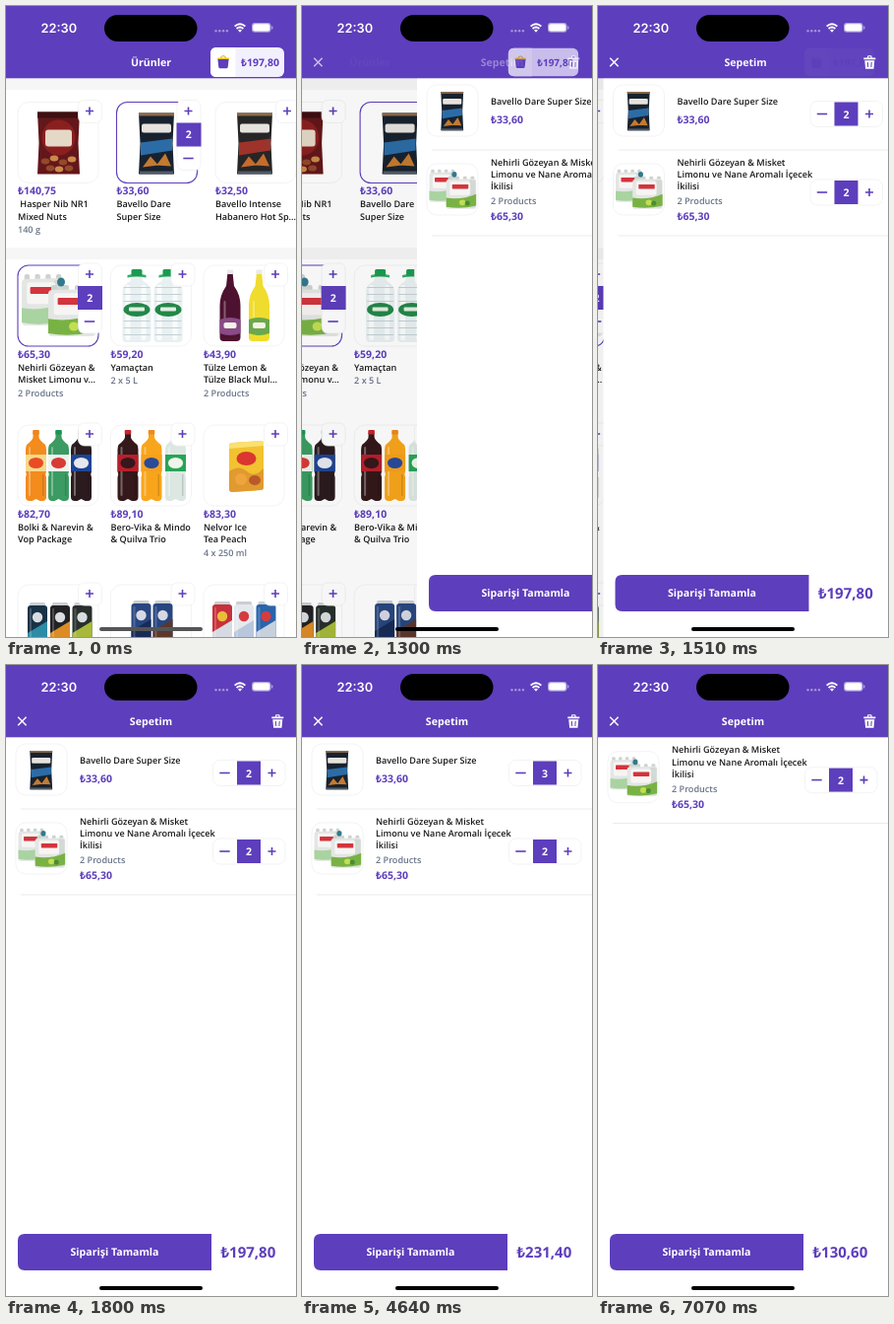
An HTML page for the animation above (7.99 s loop, 295 by 640 pixels).

```html
<!DOCTYPE html>
<html lang="tr">
<head>
<meta charset="utf-8">
<title>Sepetim</title>
<style>
html, body { margin: 0; width: 100%; height: 100%; overflow: hidden; background: #fff; }
svg { display: block; width: 295px; height: 640px; font-family: "Open Sans", "Noto Sans", sans-serif; text-rendering: geometricPrecision; }
text { white-space: pre; }
.name { font-size: 9.08px; font-weight: 600; fill: #191919; }
.sub { font-size: 9.08px; font-weight: 600; fill: #697488; }
.price { font-size: 10.5px; font-weight: 700; fill: #5d3ebc; }
.total { font-size: 15px; font-weight: 700; fill: #5d3ebc; }
.white { font-size: 10.6px; font-weight: 700; fill: #fff; text-anchor: middle; }
.clock { font: 600 12.8px Inter, sans-serif; fill: #fff; text-anchor: middle; }
.frame { fill: #fff; stroke: #f0f0f0; stroke-width: .8; }
.chosen { stroke: #5d3ebc; stroke-width: 1.1; }
.sign { fill: none; stroke: #5d3ebc; stroke-width: 1.6; }
</style>
</head>
<body>
<svg id="stage" viewBox="0 0 295 640"></svg>
<script>
const PURPLE = "#5d3ebc";
const LOOP = 7990;

// Basic pieces
const rect = (x, y, w, h, fill, r = 0) =>
  `<rect x="${x}" y="${y}" width="${w}" height="${h}" rx="${r}" fill="${fill}"/>`;
const oval = (x, y, rx, ry, fill) =>
  `<ellipse cx="${x}" cy="${y}" rx="${rx}" ry="${ry}" fill="${fill}"/>`;
const path = (d, fill) => `<path d="${d}" fill="${fill}"/>`;
const text = (x, y, cls, s, id = "") => `<text x="${x}" y="${y}" class="${cls}" id="${id}">${s}</text>`;
const group = (x, y, body, id = "", scale = 1) =>
  `<g id="${id}" transform="translate(${x} ${y}) scale(${scale})">${body}</g>`;
const frame = (x, y, w, h, r, cls = "") =>
  `<rect x="${x}" y="${y}" width="${w}" height="${h}" rx="${r}" class="frame ${cls}"/>`;
const plus = (x, y) => `<path class="sign" d="M${x - 4} ${y}h8m-4-4v8"/>`;
const minus = (x, y, r = 5.2) => `<path class="sign" d="M${x - r} ${y}h${2 * r}"/>`;

const trash = (x, y, scale, fill, line) => group(x, y,
  path("M-6-4.6h3.4l.8-2.2h3.6l.8 2.2H6v1.8H-6zM-5-1.8H5L4.2 6.8H-4.2z", fill) +
  `<path d="M-1.9 0l.3 5M1.9 0l-.3 5" stroke="${line}" fill="none"/>` +
  rect(-1.2, -5.7, 2.4, 1.1, line), "", scale);

// Products, in the 82 x 82 space of a card
const bag = (x, y, w, h, fill) =>
  path(`M${x} ${y}h${w}l-1.5 ${h / 2} 1.5 ${h / 2}h${-w}l1.5 ${-h / 2}z`, fill);

const bottle = (x, drink, cap, label, mark, w = 21) => {
  const c = x + w / 2;
  return path(`M${c - 3} 8h6v4q0 3 ${w / 2 - 4} 8q1 2 1 5v22q-1.5 3 0 6v20q0 4-4 4h-2.5l-${w / 2 - 6.5}-2-${w / 2 - 6.5} 2h-2.5q-4 0-4-4V53q1.5-3 0-6V25q0-3 1-5Q${c - 3} 15 ${c - 3} 12z`, drink) +
    rect(c - 3.3, 5, 6.6, 4.5, cap, 1) +
    rect(x + 3, 22, 2, 50, "#ffffff55", 1) + rect(x + w - 4, 50, 1.5, 22, "#00000025") +
    rect(x, 30, w, 17, label) + oval(c, 38.5, w * .36, 5.5, mark);
};

const slimBottle = (x, drink, label) =>
  path(`M${x + 8} 7h5l1.5 14q6.5 9 6.5 20v32q0 4-4 4h-13q-4 0-4-4V41q0-11 6.5-20z`, drink) +
  rect(x + 7.3, 4.5, 6.4, 4.5, "#e9e9ef", 1) + rect(x + 4, 36, 2, 34, "#ffffff50", 1) +
  path(`M${x} 55q10.5-4 21 0v14q-10.5 4-21 0z`, label) + rect(x + 4, 58, 13, 6, "#f5f2e8", 2);

const jug = x =>
  path(`M${x + 10} 9h9l2 7q8 4 8 11v47q0 4-4 4H${x + 4}q-4 0-4-4V27q0-7 8-11z`, "#e9f0f2") +
  rect(x + 3, 20, 5, 56, "#fafcfc", 2) + rect(x + 19, 20, 5, 56, "#f8fbfb", 2) +
  [22, 29, 36, 56, 63, 70].map(y => rect(x + 1, y, 27, 1, "#c3d0d4")).join("") +
  path(`M${x + 5} 10q9.5-3 19 0v2.5q-9.5-2-19 0z`, "#35ad68") + rect(x + 9, 4, 11, 7, "#1b9a50", 1.5) +
  oval(x + 14.5, 45, 13.5, 7, "#238748") + rect(x + 6.5, 42.5, 16, 4, "#e0efe0", 1);

const can = (x, y, w, top, low, mark) =>
  rect(x + 2, y, w - 4, 4, "#c9ced3", 1.5) + rect(x, y + 3, w, 66, top, 3) +
  path(`M${x} ${y + 31}l${w}-12v50h${-w}z`, low) +
  rect(x + 2, y + 6, 2, 60, "#ffffff30") + oval(x + w / 2, y + 15, w * .26, w * .26, mark);

// Shrink-wrapped bottles, seen at a slight angle
const pack = (x, y, w, h, band) => {
  const step = w / 4;
  let s = "";
  for (let i = 0; i < 4; i++) s += rect(x + (i + .25) * step, y, step * .5, 8, "#cdd3cf", 2);
  return s + path(`M${x} ${y + 9}q0-4 4-4l${w - 8}-1q4 0 4 4v${h - 11}q0 3-4 3H${x + 4}q-4 0-4-4z`, "#e3e6e3") +
    rect(x + step * 3, y + 6, step - 1, h - 8, "#d3d9d5", 3) +
    path(`M${x} ${y + h * .66}q${w / 2} 4 ${w}-6v${h * .36}q${-w / 2} 6 ${-w} 2z`, band) +
    rect(x + w * .12, y + h * .16, w * .68, h * .42, "#f6f5f3", 3) +
    rect(x + w * .2, y + h * .25, w * .54, 7, "#d3343d", 1);
};

const chips = (x, base, tint, chip) =>
  bag(x, 11, 36, 62, base) + rect(x, 11, 36, 3, "#8a6a4c") +
  path(`M${x + 2} 41l32-4v12l-32 5z`, tint) +
  path(`M${x + 4} 66l8-11 8 9zM${x + 18} 64l9-12 6 13z`, chip) +
  rect(x + 1, 70, 34, 3, "#515b69") + rect(x + 3, 22, 30, 9, "#e6e3de", 2);

const art = {
  nuts: bag(20, 10, 43, 63, "#64171a") + rect(20, 10, 43, 6, "#3d1012") +
    oval(41.5, 36, 17, 18, "#8a1f20") +
    [[28, 60], [37, 57], [46, 61], [55, 58], [33, 67], [42, 68], [52, 67]]
      .map(([x, y], i) => oval(x, y, 4.3, 3, i % 2 ? "#c98a4b" : "#93492a")).join("") +
    rect(28, 28, 27, 17, "#e4d8c6", 3),
  blueChips: chips(22.5, "#18222f", "#2c6ca6", "#c47a30"),
  redChips: chips(22, "#272627", "#9e332b", "#c66c2c"),
  soda: pack(4, 9, 43, 52, "#a9d3a0") + pack(31, 20, 48, 52, "#79b244") +
    oval(57, 62, 5, 4.5, "#c3de52") + oval(65, 63, 4, 4, "#4c8b35") + oval(44, 17, 4, 4.5, "#32798c"),
  water: jug(12) + jug(44),
  slim: slimBottle(16.5, "#4e1231", "#8a4a86") + slimBottle(46, "#f0dc2d", "#6aa94a"),
  trio: bottle(8, "#f38b1d", "#f0831e", "#f6d98a", "#e94c24") +
    bottle(31, "#3b9b62", "#1e9450", "#eef3ec", "#d83a35") +
    bottle(54, "#2a1b1f", "#2656a0", "#1d4596", "#e7e9ef"),
  trio2: bottle(7, "#34181a", "#c9222b", "#b81f2a", "#35181b") +
    bottle(31, "#f8a51b", "#ee8a1c", "#f6a01d", "#284b9b") +
    bottle(55.5, "#dce7e2", "#239c4c", "#26a556", "#eff5ea"),
  tea: path("M26 21q0-3 3-3l29-2q3 0 3 3v44q0 3-3 3l-29 2q-3 0-3-3z", "#f2c230") +
    path("M26 21q0-3 3-3l29-2q3 0 3 3v2l-35 3z", "#fbe06f") +
    path("M26 47q10-7 18 0t17-3v19q0 3-3 3l-29 2q-3 0-3-3z", "#e09a2f") +
    oval(38, 55, 6, 6, "#f0a43e") + oval(52, 56, 6, 5, "#b95a2a") + oval(43.5, 34, 10, 7, "#db3630"),
  brews: can(10, 18, 20, "#183246", "#2d8ba5", "#d9dde0") +
    can(33, 18, 20, "#222225", "#dc8c25", "#d9dde0") + can(55.5, 18, 20, "#27302c", "#a7b83a", "#d9dde0"),
  coffees: can(21, 16, 20, "#28467f", "#172b56", "#d6d9e3") + can(43, 16, 20, "#28467f", "#5b372c", "#d6d9e3"),
  energy: can(9, 17, 20, "#c8303a", "#d6dae2", "#e8bd3c") +
    can(31, 17, 20, "#e5e8ed", "#b8c7dc", "#d63c3f") + can(53.5, 17, 20, "#2a64ab", "#c7d0dd", "#d63c3f")
};

// Shop page
function card(x, y, pic, price, names, sub, count) {
  let s = frame(0, 0, 82, 82, 11, count ? "chosen" : "") + art[pic] +
    frame(61.5, -2, 24, count ? 71 : 23, 6) + plus(73, 9);
  if (count) s += rect(61, 21, 25, 24, PURPLE) + text(73.3, 36.8, "white", count) + minus(73, 57);
  s += text(0, 93.6, "price", price);
  names.forEach((n, i) => s += text(0, 106.8 + 12.4 * i, "name", n));
  if (sub) s += text(0, 107.4 + 12.6 * names.length, "sub", sub);
  return group(x, y, s);
}

const shop = rect(0, 73, 295, 567, "#fff") + rect(0, 73, 295, 12, "#f6f6f6") + rect(0, 245, 295, 12, "#f6f6f6") +
  card(12, 97.5, "nuts", "₺140,75", [" Hasper Nib NR1", "Mixed Nuts"], "140 g") +
  card(112.5, 97.5, "blueChips", "₺33,60", ["Bavello Dare", "Super Size"], "", 2) +
  card(213, 97.5, "redChips", "₺32,50", ["Bavello Intense", "Habanero Hot Sp..."]) +
  card(12, 263, "soda", "₺65,30", ["Nehirli Gözeyan &amp;", "Misket Limonu v..."], "2 Products", 2) +
  card(106.5, 263, "water", "₺59,20", ["Yamaçtan"], "2 x 5 L") +
  card(201, 263, "slim", "₺43,90", ["Tülze Lemon &amp;", "Tülze Black Mul..."], "2 Products") +
  card(12, 425, "trio", "₺82,70", ["Bolki &amp; Narevin &amp;", "Vop Package"]) +
  card(106.5, 425, "trio2", "₺89,10", ["Bero-Vika &amp; Mindo", "&amp; Quilva Trio"]) +
  card(201, 425, "tea", "₺83,30", ["Nelvor Ice", "Tea Peach"], "4 x 250 ml") +
  card(12, 587, "brews", "", []) + card(106.5, 587, "coffees", "", []) + card(201, 587, "energy", "", []);

// Basket page
const thumb = (y, pic) => frame(10, y, 52, 52, 10) + group(10, y, art[pic], "", .635);
const stepper = (y, left, id) => frame(210.5, y - 13, 73.5, 26, 7) + left +
  rect(235, y - 12, 24, 24, PURPLE) + text(247, y + 4, "white", 2, id) + plus(270.5, y);
const divider = y => rect(15, y, 280, .8, "#e6e6e6");

const first = thumb(80, "blueChips") + text(75, 100.4, "name", "Bavello Dare Super Size") +
  text(75, 119.2, "price", "₺33,60") +
  stepper(109.5, `<g id="less">${minus(222.5, 109.5)}</g><g id="bin">${trash(223, 109.5, .75, PURPLE, "#fff")}</g>`, "count") +
  divider(145.6);

const second = thumb(160, "soda") +
  ["Nehirli Gözeyan &amp; Misket", "Limonu ve Nane Aromalı İçecek", "İkilisi"]
    .map((n, i) => text(75, 161.8 + 12.3 * i, "name", n)).join("") +
  text(75, 201.4, "sub", "2 Products") + text(75, 217, "price", "₺65,30") +
  stepper(189, minus(222.5, 189), "") + divider(232.6);

const basket = rect(0, 73, 295, 567, "#fff") + group(0, 0, first, "first") + group(0, 0, second, "second") +
  path("M19 577H209V614H19q-7 0-7-7V584q0-7 7-7z", PURPLE) +
  text(110.5, 599.4, "white", "Siparişi Tamamla") + text(218.5, 601.4, "total", "", "total");

// Fixed bars
const status = rect(100, 9, 94.5, 27, "#000", 13.5) + text(53.8, 26.6, "clock", "22:30") +
  [213.5, 217.3, 221.1, 224.9].map(x => oval(x, 25.3, 1.2, 1.2, "#ffffff70")).join("") +
  `<g fill="none" stroke="#fff" stroke-width="1.9"><path d="M232.6 20.6q5.4-4.8 10.8 0M234.6 23q3.4-2.9 6.8 0"/></g>` +
  path("M236 24.6q2-1.5 4 0l-2 2.2z", "#fff") +
  rect(250, 17, 19.5, 9.8, "#ffffff80", 3) + rect(251.2, 18.2, 17.1, 7.4, "#fff", 2) + rect(270.2, 20.2, 1.2, 3.4, "#ffffff90", .6);

const cart = rect(-37.5, -15, 75, 30, "#f3f0fe", 6) + path("M-31.5-15H-12V15H-31.5q-6 0-6-6V-9q0-6 6-6z", "#fff") +
  path("M-30.2-4h11.4l-1 9q-.2 1.3-1.5 1.3h-6.4q-1.3 0-1.5-1.3z", PURPLE) +
  path("M-30.4-4.4h11.8v1.4h-11.8z", "#f5c518") +
  `<path d="M-27-4q0-2.4 2.5-2.4t2.5 2.4" fill="none" stroke="#d8ae1c"/>` +
  text(-6.6, 3.8, "price", "₺197,80");

const stage = document.getElementById("stage");
stage.innerHTML = group(0, 0, shop, "shop") +
  `<rect id="dim" y="73" width="295" height="567"/>` + group(0, 0, basket, "basket") +
  rect(0, 0, 295, 73.3, PURPLE) +
  text(147.5, 61, "white", "Ürünler", "oldTitle") + text(147.5, 61, "white", "Sepetim", "newTitle") +
  group(245.5, 57, cart, "cart") +
  `<g id="tools"><path d="M12.2 52.8l8.4 8.4m0-8.4l-8.4 8.4" stroke="#fff" stroke-width="1.5"/>${trash(276.3, 57, 1, "#fff", PURPLE)}</g>` +
  status + `<rect id="home" x="95" y="630" width="105" height="4" rx="2"/>`;

const el = id => document.getElementById(id);
const set = (id, attrs) => { for (const k in attrs) el(id).setAttribute(k, attrs[k]); };
const shift = (x, y = 0) => `translate(${x} ${y})`;
const last = (list, t) => list.filter(v => v <= t).pop();

const ticks = [0, 1050, 1180, 1300, 1410, 1510, 1630, 1800];
const counts = [[0, 2], [2680, 3], [3760, 4], [4640, 3], [5410, 2], [6230, 1], [7070, 0]];

// Critically damped push
function push(t) {
  if (t >= 1800) return 1;
  const x = Math.max(0, t - 1190) * .0185;
  return 1 - (1 + x) * Math.exp(-x);
}

function draw(now) {
  const time = now % LOOP;
  const t = last(ticks, time);
  const p = push(t);
  const n = counts.filter(c => c[0] <= time).pop()[1];
  const press = t >= 1180 ? .95 : t >= 1050 ? .98 : 1;

  set("shop", { transform: shift(-88.5 * p) });
  set("dim", { opacity: .06 * p });
  set("basket", { transform: shift(295 * (1 - p)) });
  set("oldTitle", { transform: shift(-130 * p), opacity: Math.max(0, 1 - 1.6 * p) });
  set("newTitle", { transform: shift(141 * (1 - p)), opacity: p * p });
  set("cart", { transform: `translate(245.5 57) scale(${press})`, opacity: Math.min(1, 1.8 * (1 - p)) });
  set("tools", { opacity: Math.min(1, p * 1.1) });
  set("home", { fill: t < 1050 ? "#555" : "#000" });

  set("first", { visibility: n ? "visible" : "hidden" });
  set("less", { display: n > 1 ? "inline" : "none" });
  set("bin", { display: n === 1 ? "inline" : "none" });
  set("second", { transform: shift(0, n ? 0 : -72.4) });
  el("count").textContent = n;
  el("total").textContent = "₺" + (130.6 + 33.6 * n).toFixed(2).replace(".", ",");
}

function loop(now) {
  draw(now);
  requestAnimationFrame(loop);
}
draw(0);
requestAnimationFrame(loop);
</script>
</body>
</html>
```
